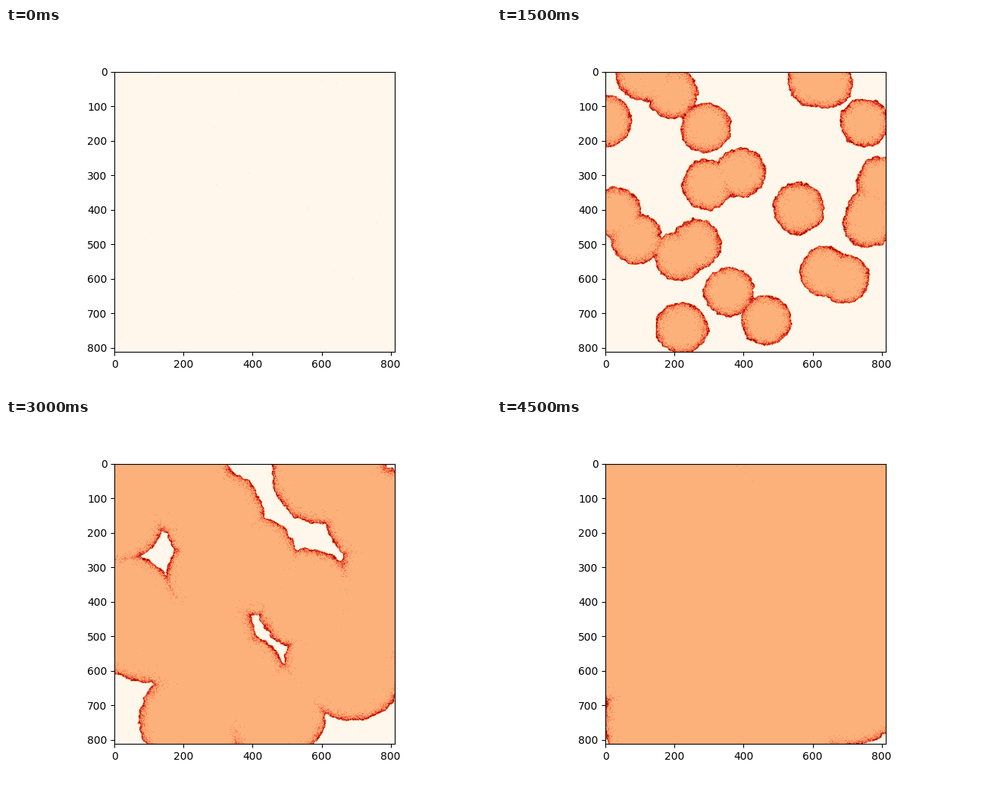
Write a matplotlib script that moves like this. It is 640 px wide and 480 px high and loops after 5000 ms.

```python
import numpy as np
import matplotlib.pyplot as plt
from matplotlib.animation import FuncAnimation

SIZE = 812
SPEED = 24.4            # cells the front advances per frame
MEAN_SICK = 6.0         # mean infectious period, in cells of front travel
HEALTHY, RECOVERED, SICK = 0.0, 0.4, 1.0

# outbreak centres: x, y
SEEDS = [
    (104, 9), (127, 16), (195, 64), (600, 17), (600, 28), (643, 33),
    (2, 143), (290, 163), (390, 294), (295, 328), (800, 319), (558, 394),
    (560, 400), (769, 413), (760, 438), (32, 409), (261, 503), (213, 534),
    (635, 578), (690, 600), (358, 637), (466, 720),
]
# outbreaks with their own relative speed
PACED = [(750, 149, 0.96), (90, 484, 1.02), (220, 743, 1.02)]
# cases that die out without spreading
ISOLATED = [(362, 64), (132, 26)]

rng = np.random.default_rng(7)


def smooth_noise(sigma, std):
    """Gaussian-filtered white noise with the given deviation."""
    f = np.fft.fftfreq(SIZE)
    kernel = np.exp(-2 * (np.pi * sigma) ** 2 * (f[:, None] ** 2 + f ** 2))
    field = np.fft.ifft2(np.fft.fft2(rng.normal(size=(SIZE, SIZE))) * kernel).real
    return field * std / field.std()


def arrival_field():
    """Front travel needed to reach every cell."""
    y, x = np.mgrid[:SIZE, :SIZE]
    reach = np.full((SIZE, SIZE), np.inf)
    centres = [(sx, sy, 1.0) for sx, sy in SEEDS] + PACED
    for sx, sy, pace in centres:
        reach = np.minimum(reach, np.hypot(x - sx, y - sy) / pace)
    reach += smooth_noise(4, 1.7) + smooth_noise(12, 1.3)
    reach += rng.normal(0, 0.8, reach.shape)
    reach = np.maximum(reach, 0.5)
    for sx, sy, *_ in centres + ISOLATED:
        reach[sy, sx] = 0
    return reach


arrival = arrival_field()
recovery = arrival + rng.exponential(MEAN_SICK, arrival.shape)


def state(frame):
    front = frame * SPEED
    grid = np.where(arrival <= front, SICK, HEALTHY)
    grid[recovery <= front] = RECOVERED
    return grid


fig, ax = plt.subplots(figsize=(6.4, 4.8), dpi=100)
image = ax.imshow(state(0), cmap="OrRd", vmin=0, vmax=1)


def update(frame):
    image.set_data(state(frame))
    return (image,)


anim = FuncAnimation(fig, update, frames=10, interval=500, repeat=True,
                     repeat_delay=0)
plt.show()
```
